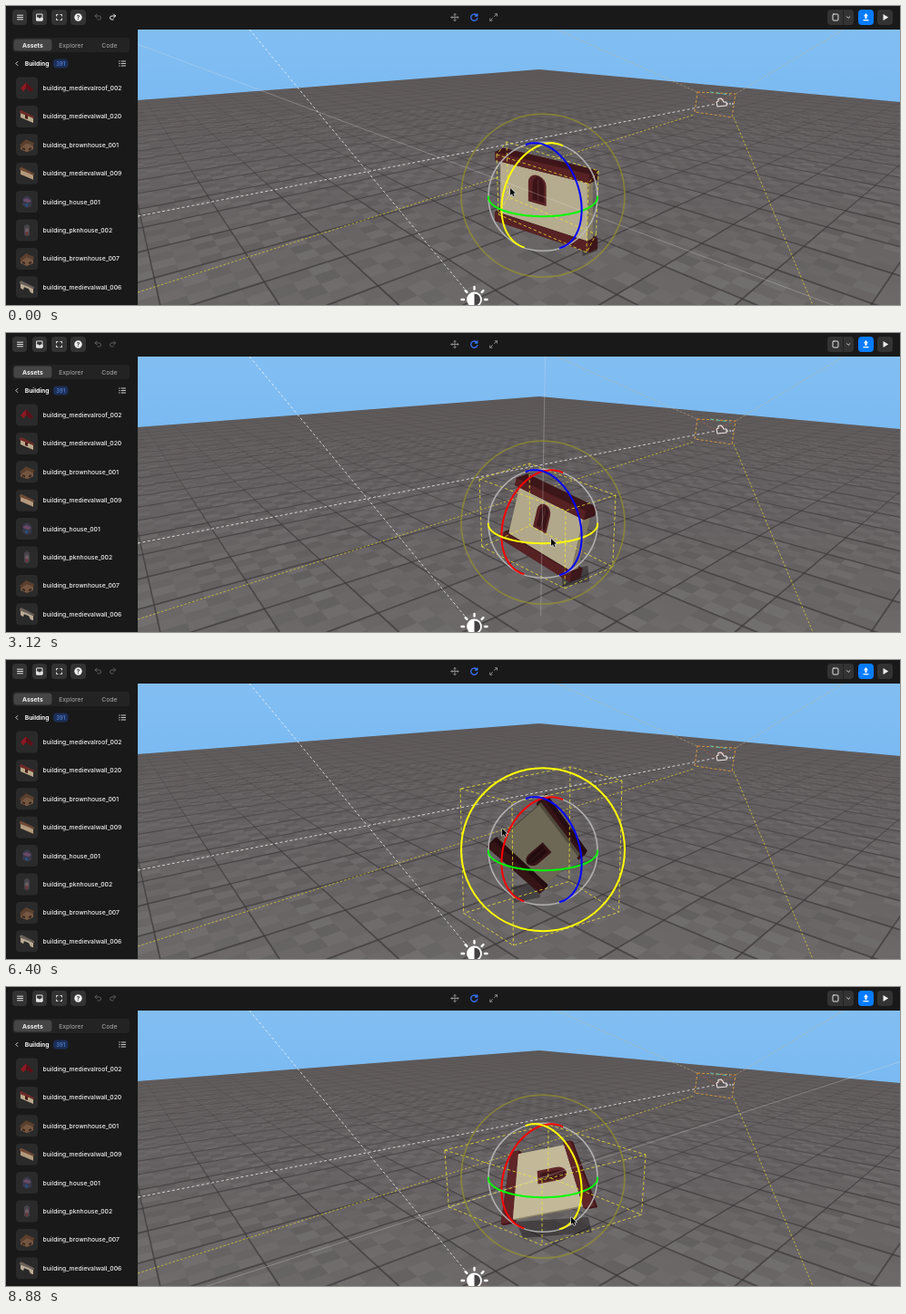
Write an HTML page with a canvas that moves like this. It is 984 px wide and 330 px high and loops after 8.96 s.

```html
<!DOCTYPE html>
<html lang="en">
<head>
<meta charset="utf-8">
<title>Rotating a wall in a scene editor</title>
<style>
  html, body { margin: 0; width: 100%; height: 100%; overflow: hidden; background: #191919; }
  canvas, svg { position: absolute; left: 0; top: 0; width: 984px; height: 330px; display: block; }
  text { font: 500 6.75px Inter, sans-serif; fill: #f2f2f2; }
  .dim { fill: #9b9b9b; }
  .bold { font-weight: 700; }
  .button { fill: #333; }
  .icon { fill: none; stroke: #e4e4e4; stroke-width: 1; stroke-linecap: round; stroke-linejoin: round; }
  .muted { stroke: #8b8b8b; }
  #redo { stroke: #ededed; }
</style>
</head>
<body>
<canvas id="stage" width="984" height="330"></canvas>
<svg id="ui" viewBox="0 0 984 330">
  <path fill="#191919" d="M0 0H984V26H145V330H0Z"/>
  <g class="button">
    <rect x="7" y="4" width="16" height="17" rx="4"/>
    <rect x="29" y="4" width="16" height="17" rx="4"/>
    <rect x="50" y="4" width="17" height="17" rx="4"/>
    <rect x="71" y="4" width="17" height="17" rx="4"/>
    <rect x="904" y="4" width="29" height="17" rx="4"/>
    <rect x="959" y="4" width="17" height="17" rx="4"/>
  </g>
  <rect x="938" y="4" width="17" height="17" rx="4" fill="#087cff"/>
  <g class="icon">
    <path d="M12.500 10.200H18.500M12.500 12.500H18.500M12.500 14.800H18.500"/>
    <path d="M34 9H40V16H34Z"/>
    <path d="M34 13H35.800L36.500 14.200H37.500L38.200 13H40V16H34Z" fill="#e4e4e4"/>
    <path d="M55.500 11V9.500H57M60 9.500H61.500V11M61.500 14V15.500H60M57 15.500H55.500V14"/>
    <rect x="910" y="9" width="6" height="7" rx="1"/>
    <path d="M921.500 4V21" stroke="#222"/>
    <path d="M925.500 11.700L927.200 13.400L928.900 11.700" stroke-width=".9"/>
    <path d="M12.800 61.500L10.800 63.500L12.800 65.500" stroke-width=".9"/>
    <path d="M127 61H131.500M127 63.500H131.500M127 66H131.500M124.500 61H125M124.500 63.500H125M124.500 66H125" stroke-width=".9"/>
  </g>
  <circle cx="79.500" cy="12.500" r="4.200" fill="#f2f2f2"/>
  <text x="79.500" y="14.900" text-anchor="middle" class="bold" style="fill:#333">?</text>
  <path d="M946.500 8L949 11.300H947.500V14H945.500V11.300H944ZM943.500 15H949.500V16.300H943.500Z" fill="#fff"/>
  <path d="M965.500 9L971.200 12.500L965.500 16Z" fill="#eee"/>
  <g class="icon muted">
    <path d="M100 9L98 11L100 13M98 11H102.500Q104.500 11 104.500 13T102.500 15H101" stroke="#5e5e5e"/>
    <path id="redo" d="M118.500 9L120.500 11L118.500 13M120.500 11H116.500Q114.500 11 114.500 13T116.500 15H118"/>
    <path d="M494 8.500V16.500M490 12.500H498M492.800 9.700L494 8.500L495.200 9.700M492.800 15.300L494 16.500L495.200 15.300M491.200 11.300L490 12.500L491.200 13.700M496.800 11.300L498 12.500L496.800 13.700"/>
    <path d="M518 10.200A3.600 3.600 0 1 0 518.800 13.600M518.800 8.800V11H516.500" stroke="#3974ff" stroke-width="1.300"/>
    <path d="M537.500 11.500L540.500 8.800M538.300 8.800H540.500V11M535.500 13.500L532.800 16.200M532.800 14V16.200H535"/>
  </g>
  <rect x="7" y="35" width="129" height="16" rx="4" fill="#232323"/>
  <rect x="8.500" y="36.500" width="42" height="13" rx="3.500" fill="#454545"/>
  <g text-anchor="middle">
    <text x="29.300" y="45.500" class="bold">Assets</text>
    <text x="71.600" y="45.500" class="dim">Explorer</text>
    <text x="113.800" y="45.500" class="dim">Code</text>
  </g>
  <text x="20.700" y="66" class="bold">Building</text>
  <rect x="52" y="58.500" width="16.500" height="10" rx="4" fill="#1c2f57"/>
  <text x="60.200" y="65.700" text-anchor="middle" style="font-size:5.800px;fill:#5586dc">391</text>
  <g id="assets"></g>
</svg>
<script>
const LOOP = 8960, STEP = 80;
const stage = document.getElementById('stage');
const redo = document.getElementById('redo');
let ctx = stage.getContext('2d');

// ---------- asset list ----------
const part = (fill, d) => `<path fill="${fill}" d="${d}"/>`;
const panel = (face, beam) => part(face, 'M-7-5L7 2V7L-7 1Z') + part(beam, 'M-8-6L-6-7L8 0V2L-8-4Z');
const house = part('#5b3f2d', 'M-8 0L-1-6L8-2L7 1L0-2L-6 3Z') + part('#755640', 'M-7 3L0-2L7 1V5L0 8L-7 5Z') + part('#35251d', 'M-5 3L-2 4V6L-5 5ZM2 4L5 3V5L2 6Z');
const thumbs = {
  roof: part('#8d1922', 'M-7 0L-1-6L7 2L4 4L-1 0L-4 4Z') + part('#5c1017', 'M-1-6L7 2L4 4L-1 0Z'),
  wall: panel('#b9a98a', '#6d2a27') + part('#4a1b1c', 'M-2-2L1-1V3L-2 2Z'),
  plain: panel('#b39a7c', '#6e4a34'),
  brown: house,
  house: part('#38384a', 'M-4-5L1-7L5-3V5L0 7L-5 4Z') + part('#6a4a66', 'M-5-2L0-4L5-1L2 1L-2 0Z') + part('#274f7b', 'M-2 2H1V5H-2Z'),
  tower: part('#47434a', 'M-3-5L0-7L3-5V5L0 7L-3 5Z') + part('#6b5c64', 'M-2-1L0-3L2-1V2H-2Z') + part('#7c3031', 'M-1 2H1V5H-1Z'),
  arch: part('#b9ab94', 'M-7-5L7 2V7L4 6L2 2L-3 0L-4 3L-7 1Z') + part('#69605a', 'M-8-6L-6-7L8 0V2L-8-4Z')
};
const assets = [
  ['medievalroof_002', 'roof'], ['medievalwall_020', 'wall'], ['brownhouse_001', 'brown'], ['medievalwall_009', 'plain'],
  ['house_001', 'house'], ['pknhouse_002', 'tower'], ['brownhouse_007', 'brown'], ['medievalwall_006', 'arch']
];
document.getElementById('assets').innerHTML = assets.map(([name, thumb], i) =>
  `<g transform="translate(0 ${90.5 + i * 31.4})"><rect x="11" y="-12" width="24" height="24" rx="4" fill="#2a2a2a"/>` +
  `<g transform="translate(23 0)">${thumbs[thumb]}</g><text x="40.500" y="2.400">building_${name}</text></g>`).join('');

// ---------- drawing helpers ----------
function trace(points) {
  ctx.beginPath();
  points.forEach(([x, y]) => ctx.lineTo(x, y));
}
function fill(points, color) {
  trace(points);
  ctx.closePath();
  ctx.fillStyle = color;
  ctx.fill();
}
function line(points, color, width = 1, dash = []) {
  trace(points);
  ctx.setLineDash(dash);
  ctx.strokeStyle = color;
  ctx.lineWidth = width;
  ctx.stroke();
  ctx.setLineDash([]);
}
function circle(x, y, r, color, width) {
  ctx.beginPath();
  ctx.arc(x, y, r, 0, 7);
  ctx.strokeStyle = color;
  ctx.lineWidth = width;
  ctx.stroke();
}

// ---------- static scene ----------
const VP_RIGHT = [1158, 26], VP_LEFT = [102, 26], FAR_CORNER = [587, 70];
const TILE_U = 0.018, TILE_V = 0.0205, TILES = 30, CELLS = 4;

const depth = (u, v) => 1 - u * TILE_U - v * TILE_V;
function ground(u, v) {
  return [0, 1].map(k => (FAR_CORNER[k] - u * TILE_U * VP_RIGHT[k] - v * TILE_V * VP_LEFT[k]) / depth(u, v));
}
const noise = (i, j) => { const n = Math.sin(i * 127.1 + j * 311.7) * 43758.5; return n - Math.floor(n); };

function drawFloor() {
  ctx.save();
  trace([FAR_CORNER, [984, 106], [984, 330], [145, 330], [145, 104]]);
  ctx.clip();
  const tone = ctx.createLinearGradient(0, 70, 0, 330);
  tone.addColorStop(0, '#5f5a5a');
  tone.addColorStop(.4, '#656061');
  tone.addColorStop(1, '#6c6868');
  ctx.fillStyle = tone;
  ctx.fillRect(145, 60, 839, 270);
  const d = 1 / CELLS;
  for (let i = 0; i < TILES * CELLS; i++) for (let j = 0; j < TILES * CELLS; j++) {
    const u = i * d, v = j * d, w = depth(u, v);
    if (w > .5 || w < .08) continue;
    const light = ((i + j) % 2 ? .022 : -.022) + (noise(i, j) - .5) * .05;
    const color = light > 0 ? `rgba(255,255,255,${light})` : `rgba(0,0,0,${-light * 1.4})`;
    fill([ground(u, v), ground(u + d, v), ground(u + d, v + d), ground(u, v + d)], color);
  }
  for (let i = 0; i < TILES; i++) for (let j = 0; j < TILES; j++) {
    const w = depth(i, j);
    if (w < .08) continue;
    line([ground(i + 1, j), ground(i, j), ground(i, j + 1)], `rgba(60,56,58,${Math.min(.7, .17 / w)})`, Math.min(2.4, .3 / w));
  }
  ctx.restore();
}

function drawHelpers() {
  const white = 'rgba(255,255,255,.8)', yellow = 'rgba(226,216,50,.75)', tan = 'rgba(205,185,130,.6)';
  line([[268, 26], [508, 316]], white, .9, [3, 2.5]);
  line([[145, 232], [782, 108]], white, .9, [3, 2.5]);
  line([[145, 316], [757, 120]], yellow, .9, [2.5, 2]);
  line([[801, 123], [888, 330]], yellow, .9, [2.5, 2]);
  line([[606, 26], [761, 95]], tan, .8, [3, 1.5]);
  line([[922, 26], [803, 97]], tan, .8, [3, 1.5]);
  line([[761, 95], [803, 97], [799, 123], [758, 117], [761, 95]], '#d0963c', 1, [3, 2]);
  line([[775, 95], [797, 98]], '#58c7b4', 1, [4, 3]);
  line([[761, 95], [780, 107], [803, 97]], 'rgba(214,90,60,.7)', .8, [2, 2]);
  ctx.lineJoin = 'round';
  line([[782, 106], [784, 105], [784, 102.5], [787, 102], [789, 104], [790, 106], [793, 106], [793, 110], [783, 111], [782, 106]], '#f4e9e9', 1.1);
  line([[793, 108], [801, 108]], '#eee', 1, [2, 1]);
}

function drawSun() {
  const [x, y] = [515.5, 324];
  ctx.lineCap = 'round';
  for (let i = 0; i < 8; i++) {
    const a = i * Math.PI / 4, at = r => [x + r * Math.cos(a), y + r * Math.sin(a)];
    line([at(11.5), at(14)], '#fff', 2.4);
  }
  ctx.lineCap = 'butt';
  ctx.beginPath();
  ctx.arc(x, y, 7.5, 0, 7);
  ctx.fillStyle = '#454243';
  ctx.fill();
  ctx.beginPath();
  ctx.arc(x, y, 7.5, Math.PI / 2, Math.PI * 1.5);
  ctx.fillStyle = '#fff';
  ctx.fill();
  circle(x, y, 7.5, '#fff', 1.8);
}

function renderBackdrop() {
  const layer = document.createElement('canvas');
  layer.width = 984;
  layer.height = 330;
  const screen = ctx;
  ctx = layer.getContext('2d');
  const sky = ctx.createLinearGradient(0, 26, 0, 106);
  sky.addColorStop(0, '#82bef2');
  sky.addColorStop(1, '#7abaf2');
  ctx.fillStyle = sky;
  ctx.fillRect(145, 26, 839, 90);
  drawFloor();
  drawHelpers();
  drawSun();
  ctx = screen;
  return layer;
}

// ---------- timeline ----------
// centre x, y, width, its angle, height, its angle, brightness, taper, thickness x, y
const uprightWall = [594, 212, 73, 6, 82, 90, 1, .15, 8, -3];
const walls = [
  [0, [592, 213, 108, 16, 81, 90, 1, .13, 6, -3]],
  [2080, [594, 213, 107, 17, 84, 101, 1, .13, 6, -3]],
  [3120, [594, 214, 86, 29, 75, 103, .98, .13, 8, -3]],
  [4640, uprightWall],
  [5400, uprightWall],
  [6400, [587, 207, 77, -132, 74, -41, .6, .24, 2, -3]],
  [7040, uprightWall],
  [7920, uprightWall],
  [8880, [593, 214, 76, 84, 86, 169, 1.08, .45, 2, 1]]
];
// left, front and right top corners, front height
const uprightBox = [516, 147, 620, 172, 675, 162, 126];
const boxes = [
  [0, [540, 164, 641, 196, 652, 182, 76]],
  [2080, [535, 160, 630, 193, 657, 182, 84]],
  [3120, [521, 161, 616, 196, 671, 179, 86]],
  [4640, uprightBox],
  [5400, uprightBox],
  [6400, [500, 142, 557, 157, 678, 133, 158]],
  [7040, uprightBox],
  [7920, uprightBox],
  [8880, [483, 180, 590, 213, 704, 185, 72]]
];
// x, y, half width
const shadows = [
  [0, [642, 264, 9]], [2080, [640, 264, 13]], [3120, [626, 268, 16]], [4640, [618, 265, 19]], [5400, [618, 265, 19]],
  [6400, [572, 256, 16]], [7040, [618, 265, 19]], [7920, [618, 265, 19]], [8880, [603, 265, 42]]
];
const pointer = [
  [0, [555, 201]], [2080, [608, 227]], [3120, [600, 227]], [4800, [626, 198]], [5400, [668, 165]],
  [6400, [546, 186]], [7040, [668, 165]], [8880, [622, 254]]
];
const handles = [[0, 'x'], [1520, 'y'], [3440, 'z'], [5200, 'view'], [7840, 'z']];

function sample(track, t) {
  const i = track.findIndex(([at]) => at > t);
  if (i < 0) return track.at(-1)[1];
  const [[t0, a], [t1, b]] = [track[i - 1], track[i]];
  return a.map((v, n) => v + (b[n] - v) * (t - t0) / (t1 - t0));
}

// ---------- moving parts ----------
const rad = Math.PI / 180;
const polar = (length, angle) => [length * Math.cos(angle * rad), length * Math.sin(angle * rad)];

function drawWall([cx, cy, width, widthAngle, height, heightAngle, light, taper, ...back]) {
  const center = [cx, cy], across = polar(width, widthAngle), down = polar(height, heightAngle);
  const at = (u, v, w = 0) => center.map((c, k) => c + u * across[k] + v * (1 + taper * u) * down[k] + w * back[k]);
  const shade = (...rgb) => `rgb(${rgb.map(c => Math.round(c * light))})`;
  const slab = (u0, u1, v0, v1, w0, w1, front, side) => {
    const corners = [[u0, v0], [u1, v0], [u1, v1], [u0, v1]];
    fill(corners.map(c => at(...c, w1)), side);
    corners.forEach((c, i) => {
      const n = corners[(i + 1) % 4];
      fill([at(...c, w0), at(...n, w0), at(...n, w1), at(...c, w1)], side);
    });
    fill(corners.map(c => at(...c, w0)), front);
  };
  const arch = (u, v, halfWidth, top, bottom, color) => {
    const points = [at(u + halfWidth, v + bottom), at(u - halfWidth, v + bottom)];
    for (let a = 180; a <= 360; a += 20)
      points.push(at(u + halfWidth * Math.cos(a * rad), v - top + .12 * Math.sin(a * rad)));
    fill(points, color);
  };
  const wood = shade(88, 34, 36), woodSide = shade(62, 22, 25);
  slab(-.5, .5, .37, .5, -.3, 1.2, wood, woodSide);
  slab(-.46, .46, -.38, .38, 0, 1, shade(181, 171, 142), shade(131, 122, 98));
  slab(-.5, .5, -.5, -.38, -.3, 1.2, wood, woodSide);
  arch(-.07, -.1, .095, .08, .19, wood);
  arch(-.06, -.09, .06, .07, .14, shade(58, 20, 24));
  line([at(-.06, -.25), at(-.06, .05)], shade(98, 55, 51), .8);
}

function drawBox([lx, ly, fx, fy, rx, ry, h]) {
  const top = [[lx, ly], [fx, fy], [rx, ry], [lx + rx - fx, ly + ry - fy]];
  const drop = [.87, 1, .92, .8];
  const bottom = top.map(([x, y], i) => [x + (591 - x) * .04, y + h * drop[i]]);
  const draw = points => line(points, 'rgba(240,232,50,.85)', .9, [3.5, 2.5]);
  draw([...top, top[0]]);
  draw([...bottom, bottom[0]]);
  top.forEach((p, i) => draw([p, bottom[i]]));
}

const GIZMO = [591, 210], YAW = 47 * rad, PITCH = 20.5 * rad;

function toScreen(x, y, z) {
  const flat = x * Math.sin(YAW) + z * Math.cos(YAW);
  const near = flat * Math.cos(PITCH) + y * Math.sin(PITCH);
  const scale = 60 * (1 + near * .06);
  return [
    GIZMO[0] + scale * (x * Math.cos(YAW) - z * Math.sin(YAW)),
    GIZMO[1] + scale * (flat * Math.sin(PITCH) - y * Math.cos(PITCH)),
    near
  ];
}

function drawRing(pointAt, color) {
  ctx.beginPath();
  let wasVisible = false;
  for (let a = 0; a <= 364; a += 2) {
    const [x, y, near] = toScreen(...pointAt(Math.cos(a * rad), Math.sin(a * rad)));
    const visible = near > -.02;
    if (visible && wasVisible) ctx.lineTo(x, y);
    else if (visible) ctx.moveTo(x, y);
    wasVisible = visible;
  }
  ctx.strokeStyle = color;
  ctx.lineWidth = 2;
  ctx.stroke();
}

function drawGizmo(active) {
  const [x, y] = GIZMO;
  const through = ([vx, vy]) => [[vx, vy], [x + (x - vx) * 1.5, y + (y - vy) * 1.5]];
  const axes = { x: through(VP_LEFT), z: through(VP_RIGHT), y: [[593.5, 26], [588.5, 312]] };
  if (axes[active]) line(axes[active], 'rgba(225,225,225,.32)', .9);
  const color = (axis, normal) => axis === active ? '#ff0' : normal;
  circle(x, y + .3, 60, 'rgba(190,190,190,.85)', 1.6);
  drawRing((c, s) => [0, c, s], color('x', '#f00'));
  drawRing((c, s) => [c, 0, s], color('y', '#0f0'));
  drawRing((c, s) => [c, s, 0], color('z', '#00f'));
  circle(x, y - .8, 90, color('view', 'rgba(150,150,40,.65)'), active === 'view' ? 2 : 1.7);
}

function drawPointer([x, y]) {
  const shape = [[0, 0], [0, 8], [1.9, 6.3], [3.2, 9], [4.6, 8.4], [3.4, 5.8], [5.8, 5.6]].map(([dx, dy]) => [x + dx, y + dy]);
  line([...shape, shape[0]], '#ddd', 1.2);
  fill(shape, '#080808');
}

function drawShadow([x, y, r]) {
  fill([[x - r, y - 6], [x + r * .9, y - 11], [x + r, y + 6], [x - r * .8, y + 12]], 'rgba(25,22,24,.45)');
}

const backdrop = renderBackdrop();

function render(now) {
  const t = Math.floor(now % LOOP / STEP) * STEP;
  ctx.drawImage(backdrop, 0, 0);
  ctx.save();
  ctx.beginPath();
  ctx.rect(145, 26, 839, 304);
  ctx.clip();
  drawShadow(sample(shadows, t));
  drawWall(sample(walls, t));
  drawBox(sample(boxes, t));
  drawGizmo(handles.findLast(([at]) => at <= t)[1]);
  drawPointer(sample(pointer, t));
  ctx.restore();
  redo.style.stroke = t < 480 ? '#ededed' : '#5e5e5e';
}

const start = performance.now();
function tick() {
  render(performance.now() - start);
  requestAnimationFrame(tick);
}
tick();
</script>
</body>
</html>
```
